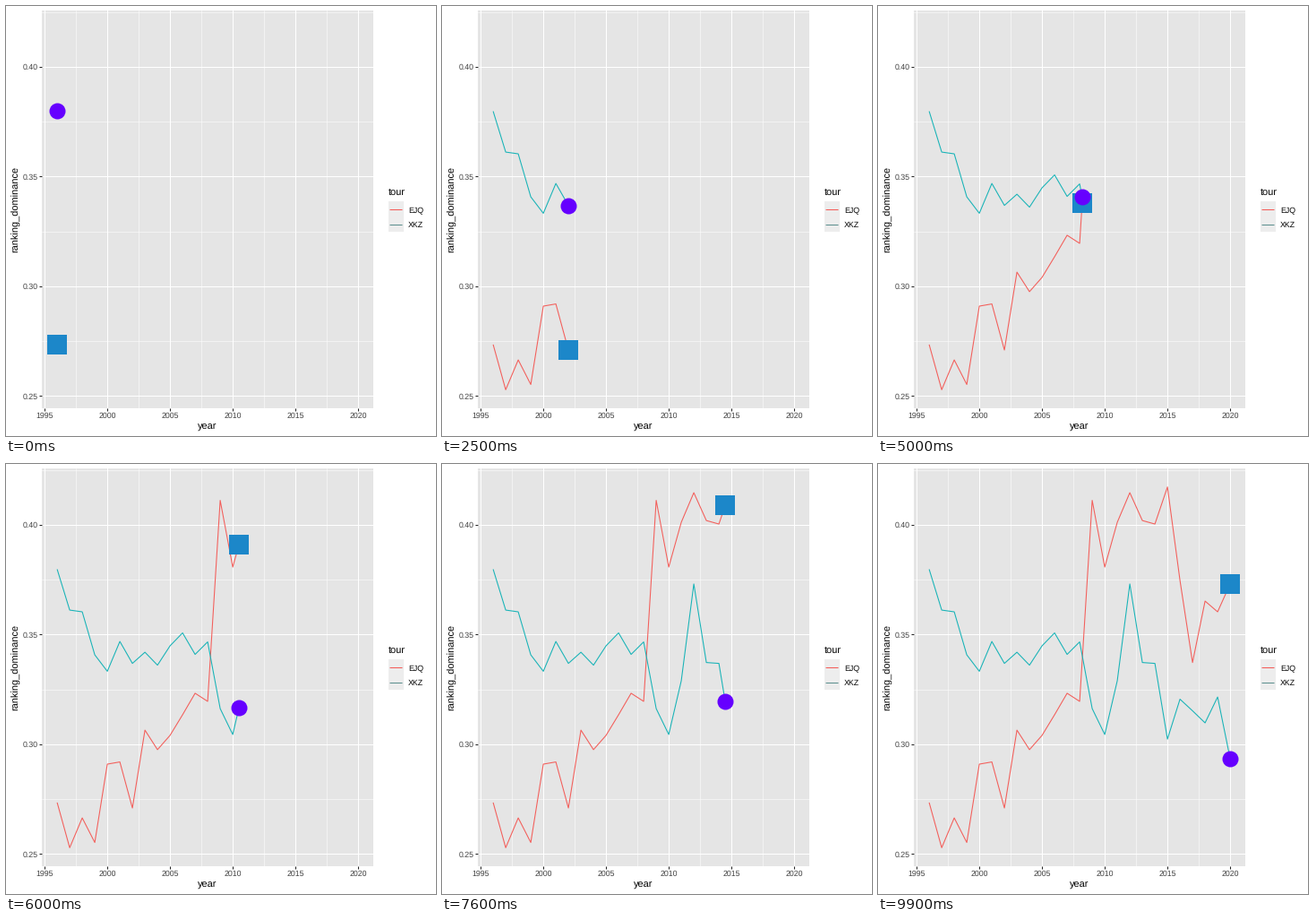
Animation, 480 px wide and 480 px high, one loop 10 s. Source, as a matplotlib script:

```python
import numpy as np
import matplotlib.pyplot as plt
from matplotlib.animation import FuncAnimation
from matplotlib.lines import Line2D
from matplotlib.patches import Rectangle
from matplotlib.ticker import MultipleLocator

SIZE, DPI = 480, 72          # at 72 dpi one point is one pixel
FRAMES, INTERVAL = 100, 100
RED, TEAL = "#F35E5A", "#17B3B7"
BLUE, PURPLE = "#1C87C9", "#6600FF"
LINE = 1.07

plt.rcParams.update({
    "font.family": "Liberation Sans",
    "text.hinting": "none",
    "toolbar": "None",
})

years = np.arange(1996, 2021)
first = np.array([
    .2735, .2529, .2665, .2553, .2910, .2920, .2710, .3065, .2976,
    .3041, .3135, .3233, .3196, .4112, .3808, .4012, .4147, .4020,
    .4004, .4173, .3747, .3373, .3653, .3604, .3731])
second = np.array([
    .3798, .3612, .3604, .3408, .3333, .3469, .3369, .3420, .3361,
    .3449, .3508, .3410, .3467, .3163, .3045, .3290, .3731, .3373,
    .3369, .3024, .3206, .3153, .3098, .3216, .2935])

# Each year is reached on a whole frame, with even motion in between.
arrival = np.round(1 + (FRAMES - 1) * (years - 1996) / 24) - 1

fig = plt.figure(figsize=(SIZE / DPI, SIZE / DPI), dpi=DPI, facecolor="white")


def label(x, y, text, size=8.8, color="black", ha="left", **kw):
    """Text with its baseline at pixel (x, y), counted from the top left."""
    fig.text(x / SIZE, 1 - y / SIZE, text, fontsize=size, color=color,
             ha=ha, va="baseline", **kw)


def limits(low, high):
    pad = 0.05 * (high - low)
    return low - pad, high + pad


# Panel
left, right, top, bottom = 40.3, 409.9, 5.5, 448.5
ax = fig.add_axes([left / SIZE, 1 - bottom / SIZE,
                   (right - left) / SIZE, (bottom - top) / SIZE],
                  facecolor="#E5E5E5")
ax.set_xlim(limits(1996, 2020))
ax.set_ylim(limits(first.min(), first.max()))
ax.spines[:].set_visible(False)
ax.set_axisbelow(True)
for axis, step in ((ax.xaxis, 5), (ax.yaxis, 0.05)):
    axis.set_major_locator(MultipleLocator(step))
    axis.set_minor_locator(MultipleLocator(step / 2))
ax.tick_params(which="major", length=2.75, width=LINE, color="#262626",
               labelbottom=False, labelleft=False)
ax.tick_params(which="minor", length=0)
ax.grid(which="major", color="white", linewidth=LINE)
ax.grid(which="minor", color="white", linewidth=LINE / 2)

# Axis text
for year in range(1995, 2021, 5):
    label(43.1 + 14 * (year - 1995), 460, str(year), color="#404040",
          ha="center")
for i in range(4):
    label(35.4, 71.2 + 122.5 * i, f"{0.40 - 0.05 * i:.2f}", color="#404040",
          ha="right")
label(225, 473, "year", 11, ha="center")
label(13.5, 227, "ranking_dominance", 11, ha="center", rotation=90,
      rotation_mode="anchor")

# Legend
label(426.5, 211, "tour", 11)
for y, name, color in ((226.5, "EJQ", RED), (243.5, "XKZ", "#5F9190")):
    fig.add_artist(Rectangle((426.5 / SIZE, 1 - (y + 8.6) / SIZE),
                             17.3 / SIZE, 17.3 / SIZE,
                             facecolor="#EDEDED", edgecolor="none",
                             transform=fig.transFigure))
    fig.add_artist(Line2D([428.3 / SIZE, 442 / SIZE], [1 - y / SIZE] * 2,
                          color=color, linewidth=LINE,
                          solid_capstyle="butt"))
    label(449, y + 3.5, name)


def series(values, color, badge, shape, size):
    line, = ax.plot([], [], color=color, linewidth=LINE, zorder=3,
                    solid_capstyle="butt", solid_joinstyle="round")
    head, = ax.plot([], [], shape, color=badge, markersize=size,
                    markeredgewidth=0, zorder=4)
    return values, line, head


tracks = [series(first, RED, BLUE, "s", 22),
          series(second, TEAL, PURPLE, "o", 18)]


def draw(frame):
    now = np.interp(frame, arrival, years)
    past = years < now
    artists = []
    for values, line, head in tracks:
        y = np.interp(now, years, values)
        line.set_data(np.append(years[past], now), np.append(values[past], y))
        head.set_data([now], [y])
        artists += [line, head]
    return artists


anim = FuncAnimation(fig, draw, frames=FRAMES, interval=INTERVAL,
                     init_func=lambda: draw(0), repeat=True, repeat_delay=0)
plt.show()
```
